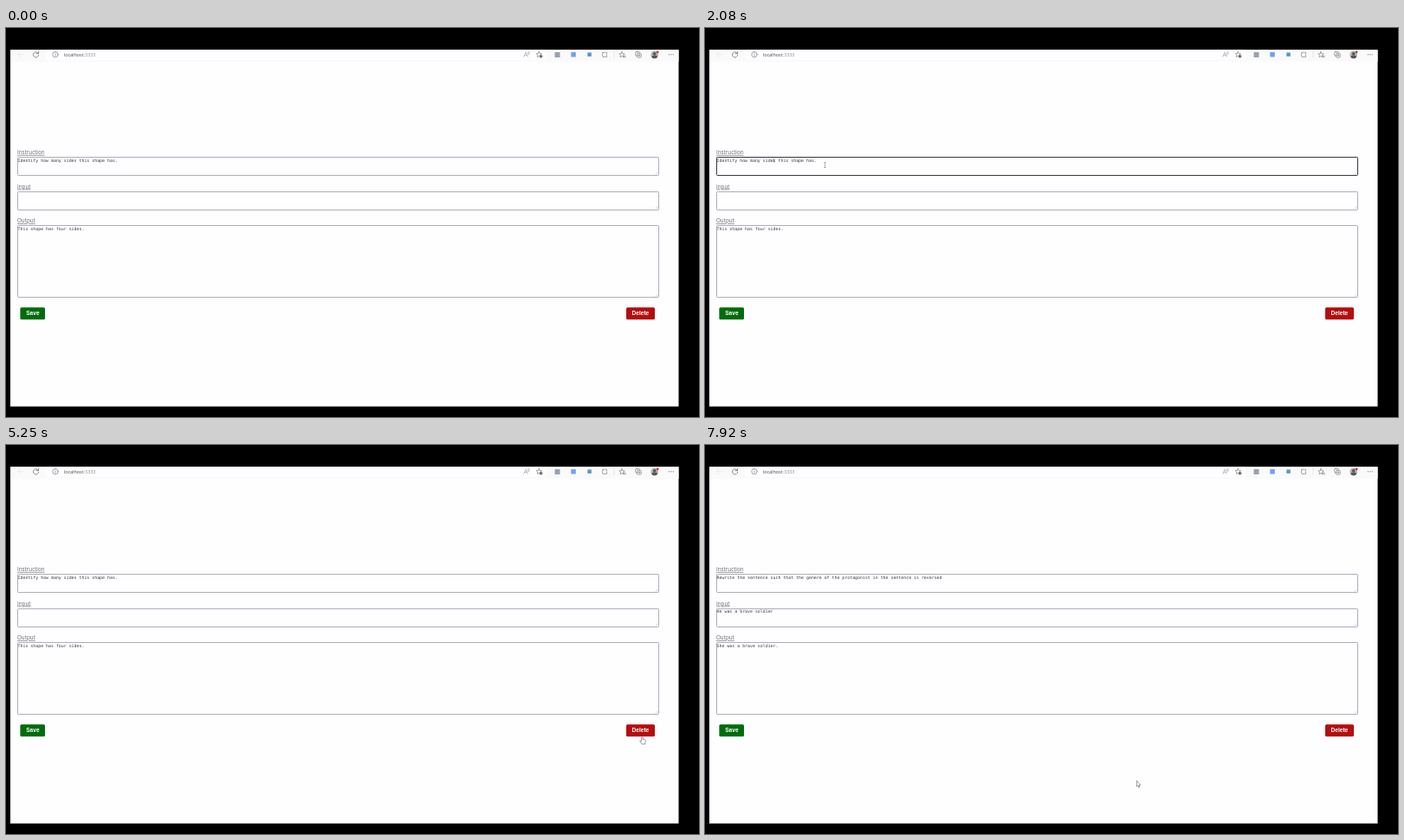
An HTML page for the animation above (8000 ms loop, 800 by 450 pixels).

```html
<!DOCTYPE html>
<html lang="en">
<head>
<meta charset="utf-8">
<title>Record editor</title>
<style>
  html, body { margin: 0; width: 100%; height: 100%; overflow: hidden; background: #000; }
  svg { display: block; width: 800px; height: 450px; }
  .label { font: 6.25px "Open Sans", sans-serif; fill: #666; text-decoration: underline; text-decoration-thickness: .5px; }
  .mono { font: 4.91px "DejaVu Sans Mono", monospace; fill: #3c3c3c; white-space: pre; }
  .button { font: bold 6.6px "Liberation Sans", Arial, sans-serif; fill: #fff; text-anchor: middle; }
  .url { font: 5.45px "Open Sans", sans-serif; fill: #444; }
  .box { fill: none; stroke: #b0afb0; }
  .box.focus { stroke: #3a393a; }
  .icon { fill: none; stroke: #777; stroke-width: .65; stroke-linecap: round; stroke-linejoin: round; }
  .grip { fill: none; stroke: #aaa; stroke-width: .4; }
  .cursor { fill: #fff; stroke: #666; stroke-width: .65; stroke-linejoin: round; }
</style>
</head>
<body>
<svg viewBox="0 0 800 450">
  <defs>
    <path id="star" d="M0-3.2 1-1 3.2-.8 1.5.8 2 3 0 1.9-2 3-1.5.8-3.2-.8-1-1Z"/>
  </defs>
  <rect width="800" height="450"/>
  <rect x="5" y="25.3" width="771.5" height="412.5" fill="#fefdff"/>
  <rect x="5" y="25.3" width="771.5" height="13.7" fill="#fafafb"/>
  <rect x="46" y="25.3" width="578" height="11.7" rx="2" fill="#fefdff"/>

  <g class="icon">
    <path d="M20.5 30.7H13.5M16.5 27.7l-3 3 3 3" stroke="#e4e4e4"/>
    <path d="M37.2 29.2A3.1 3.1 0 1 0 37.7 31.3M37.6 27.3V29.6H35.3" stroke="#555"/>
    <circle cx="57" cy="30.7" r="3.2"/>
    <path d="M57 30.3v2M57 28.9v.1"/>
    <path d="M597.8 33.4 600 28l2.2 5.4M598.6 31.6h2.8M602.4 28q1.2 1 0 2.4M603.6 27.4q1.6 1.6 0 3.6" stroke="#888" stroke-width=".5"/>
    <use href="#star" x="615.3" y="30.5"/>
    <circle cx="617.5" cy="32.7" r="1.5" fill="#666"/>
    <path d="M689 28.6h1.3q.9-1.8 1.8 0h1.5v1.4q-1.8.9 0 1.8v1.6h-4.6q-1.6-2.4 0-4.8Z"/>
    <path d="M702 26.5v8" stroke="#ddd"/>
    <use href="#star" x="711" y="30.7"/>
    <path d="M713 32.2h2.2M713 33.7h2.2"/>
    <rect x="726.7" y="27.5" width="4.8" height="4.8" rx="1"/>
    <rect x="728.5" y="29.3" width="4.8" height="4.8" rx="1" fill="#fafafb"/>
    <path d="M729.7 31.7h2.4M730.9 30.5v2.4"/>
  </g>
  <rect x="633.5" y="28" width="6" height="6" fill="#9aa0b2"/>
  <rect x="652.3" y="28" width="5.5" height="5.5" fill="#6ea2f2"/>
  <rect x="671.3" y="28.4" width="4.5" height="4.5" fill="#5c93cf"/>
  <circle cx="748.7" cy="30.9" r="4.3" fill="#b5b1b3"/>
  <path d="M745.3 33.7q.4-2.3 3.4-2.3t3.4 2.3a4.4 4.4 0 0 1-6.8 0Z" fill="#555"/>
  <circle cx="748.7" cy="29.7" r="1.8" fill="#555"/>
  <circle cx="752.2" cy="27.8" r="1.4" fill="#d32f3a"/>
  <path d="M765.4 30.8h.1M767.8 30.8h.1M770.2 30.8h.1" stroke="#555" stroke-width="1.1" stroke-linecap="round"/>
  <text class="url" x="66.8" y="32.7">localhost<tspan fill="#888">:3333</tspan></text>

  <g id="fields"></g>
  <rect id="caret" x="78.9" y="150.6" width=".5" height="5" fill="#333"/>

  <rect x="16.4" y="323.2" width="28.6" height="14" rx="1.5" fill="#006c0b"/>
  <text class="button" x="30.9" y="332.3">Save</text>
  <rect x="716" y="323.2" width="33" height="14" rx="1.5" fill="#b50d0f"/>
  <text class="button" x="732.4" y="332.3">Delete</text>

  <g id="arrow" class="cursor"><path d="M0 0V6.8L1.5 5.5 2.5 7.9 3.6 7.4 2.6 5.2 4.5 5Z"/></g>
  <g id="beam" class="cursor"><path d="M-1.2-3H1.2M0-3V3M-1.2 3H1.2" fill="none" stroke="#888"/></g>
  <g id="hand" class="cursor"><path d="M-1.3 1.2V-3.6Q-.6-5 .2-3.6V-1.2L2.6-.6Q3.4-.3 3.2.8L2.6 4.5H-.9L-3.2 1.2Q-3-.1-1.3 1.2Z"/></g>
</svg>
<script>
const LOOP = 8000, TICKS_PER_MS = 0.012;
const FOCUS_ON = 18, FOCUS_OFF = 41, NEXT_RECORD = 80;
const $ = id => document.getElementById(id);

const fields = [
  { label: "Instruction", y: 149.5, h: 21, texts: ["Identify how many sides this shape has.",
    "Rewrite the sentence such that the genere of the protagonist in the sentence is reversed"] },
  { label: "Input", y: 189.2, h: 21, texts: ["", "He was a brave soldier"] },
  { label: "Output", y: 228.7, h: 83, texts: ["This shape has four sides.", "She was a brave soldier."] }
];

$("fields").innerHTML = fields.map(({ label, y, h }) => `
  <text class="label" x="13" y="${y - 3.6}">${label}</text>
  <rect class="box" x="13.5" y="${Math.floor(y) + 0.5}" width="740" height="${h}" rx=".8"/>
  <path class="grip" d="M749.6 ${y + h - 1}l3-3M751.2 ${y + h - 1}l1.4-1.4"/>
  <text class="mono" x="13.6" y="${y + 5.2}"></text>`).join("");
const boxes = document.querySelectorAll(".box");
const texts = document.querySelectorAll(".mono");

// Pointer stops: tick, x, y, shape
const stops = [
  [5, 8, 368, "arrow"], [7, 40, 322, "beam"], [10, 94.5, 274, "beam"],
  [13, 88, 200, "beam"], [16, 80, 155, "beam"], [20, 80, 155, "beam"],
  [25, 138.5, 158.5, "beam"], [30, 150, 172, "beam"], [34, 190, 316, "arrow"],
  [38, 228, 387, "arrow"], [42, 226, 382, "arrow"], [44, 220, 312, "beam"],
  [46, 214, 302, "beam"], [50, 232, 290, "beam"], [54, 300, 314, "arrow"],
  [58, 480, 376, "arrow"], [61, 660, 356, "arrow"], [63, 735, 341.5, "hand"],
  [66, 734, 334, "hand"], [80, 734, 334, "hand"], [83, 710.3, 344.5, "hand"],
  [84, 650, 354, "arrow"], [88, 407, 380, "arrow"], [89, 399, 378, "arrow"],
  [91, 415, 380, "arrow"], [95, 498.3, 388.3, "arrow"]
];

function pointerAt(tick) {
  const i = stops.findLastIndex(s => s[0] <= tick);
  if (i < 0) return null;
  const a = stops[i], b = stops[i + 1] || a;
  const k = a === b ? 0 : (tick - a[0]) / (b[0] - a[0]);
  return { x: a[1] + (b[1] - a[1]) * k, y: a[2] + (b[2] - a[2]) * k, shape: a[3] };
}

function draw(now) {
  const tick = Math.floor((now % LOOP + 5) * TICKS_PER_MS) % 96;
  const record = tick < NEXT_RECORD ? 0 : 1;
  const focused = tick >= FOCUS_ON && tick < FOCUS_OFF;
  fields.forEach((field, i) => texts[i].textContent = field.texts[record]);
  boxes[0].classList.toggle("focus", focused);
  const blinkOn = Math.floor((tick - FOCUS_ON) / 6.36) % 2 === 1;
  $("caret").style.display = focused && blinkOn ? "" : "none";

  const pointer = pointerAt(tick);
  for (const shape of ["arrow", "beam", "hand"]) {
    const visible = pointer && pointer.shape === shape;
    $(shape).style.display = visible ? "" : "none";
    if (visible) $(shape).setAttribute("transform", `translate(${pointer.x} ${pointer.y})`);
  }
}

const start = performance.now();
function loop(now) {
  draw(Math.max(0, now - start));
  requestAnimationFrame(loop);
}
requestAnimationFrame(loop);
</script>
</body>
</html>
```
